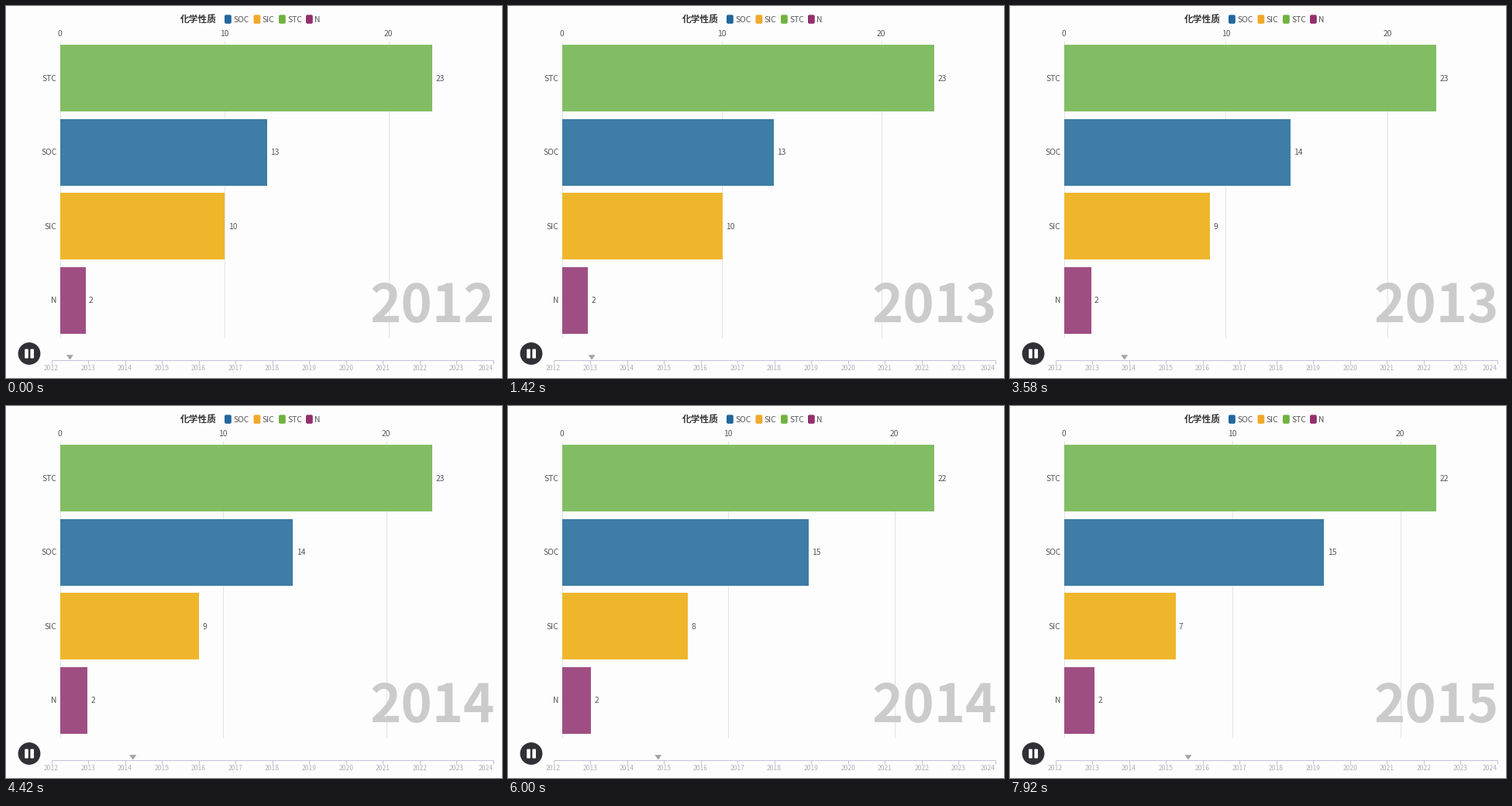
These frames come from a looping animation (640 px wide and 480 px high, 8000 ms). A matplotlib script:

```python
import numpy as np
import matplotlib.pyplot as plt
from matplotlib.animation import FuncAnimation
from matplotlib.patches import Circle, FancyBboxPatch, Polygon, Rectangle

W, H, DPI = 640, 480, 100
FRAMES, STEP = 200, 40
RATE = 12  # visible steps per second
PX = 72 / DPI

BG, INK, DARK = "#fdfdfd", "#555555", "#303036"
GRID, TIMELINE, FAINT = "#e0e2ec", "#c2c2dc", "#b2b2ba"

X0, BAR_END = 69.5, 550
TOP, PITCH, BAR_H = 50, 95.5, 86
TL_X0, TL_STEP, TL_Y = 58.5, 47.52, 456.5

# elapsed time (ms) against years since 2012
CLOCK = ([0, 1420, 2420, 3580, 5330, 6670, 8000],
         [0.504, 1.045, 1.424, 1.876, 2.586, 3.108, 3.642])

# values at the start of the loop and at each new year
YEARS = [0.504, 1, 2, 3, 4]
SERIES = {
    "STC": ([22.65, 23.33, 22.96, 22.29, 22.02], "#82bd63"),
    "SOC": ([12.62, 13.21, 14.10, 14.95, 15.80], "#3d7da6"),
    "SIC": ([10.04, 10.12, 8.86, 7.35, 6.17], "#efb62c"),
    "N": ([1.57, 1.635, 1.69, 1.765, 1.848], "#9f4e83"),
}
LEGEND = [("SOC", 282, "#23669c"), ("SIC", 319.5, "#f0a92b"),
          ("STC", 352, "#70b340"), ("N", 387, "#91306c")]

plt.rcParams["font.family"] = ["Noto Sans CJK JP", "DejaVu Sans"]
fig = plt.figure(figsize=(W / DPI, H / DPI), dpi=DPI, facecolor=BG)
ax = fig.add_axes([0, 0, 1, 1])
ax.set(xlim=(0, W), ylim=(H, 0))
ax.axis("off")


def label(x, y, s, size=10.3, color=INK, ha="left", weight="normal", z=5):
    return ax.text(x, y, s, fontsize=size * PX, color=color, ha=ha,
                   va="baseline", weight=weight, zorder=z)


def line(xs, ys, color, z=3):
    return ax.plot(xs, ys, color=color, lw=PX, zorder=z,
                   solid_capstyle="butt")[0]


def rounded(x, y, w, h, r, color, z=5):
    ax.add_patch(FancyBboxPatch((x + r, y + r), w - 2 * r, h - 2 * r,
                                boxstyle=f"round,pad={r}", fc=color,
                                lw=0, zorder=z))


# legend
label(225, 21.3, "化学性质", 11.7, "#333333", weight="bold")
for name, x, color in LEGEND:
    rounded(x, 11.4, 8.8, 11.4, 2, color)
    label(x + 11.3, 21, name)

# play control
ax.add_patch(Circle((30, 448.5), 14.4, fc=DARK, lw=0, zorder=5))
for x in (24.2, 31.4):
    rounded(x, 442.6, 4.6, 12, 1, "white", 6)

# timeline
line([TL_X0, TL_X0 + 12 * TL_STEP], [TL_Y] * 2, TIMELINE)
for i in range(13):
    x = TL_X0 + i * TL_STEP
    line([x, x], [TL_Y, TL_Y + 5], TIMELINE)
    label(min(x, 619.6), 469.6, str(2012 + i), 8.6, FAINT, "center")
pointer = ax.add_patch(Polygon([[0, 0]] * 3, fc="#a2a2a8", lw=0, zorder=6))

# chart
line([X0, X0], [45, 428], GRID, 1)
label(X0, 39, "0", ha="center")
ticks = [(v, line([X0, X0], [45, 428], GRID, 1),
          label(X0, 39, str(v), ha="center")) for v in (10, 20)]

bars = []
for i, (name, (values, color)) in enumerate(SERIES.items()):
    y = TOP + i * PITCH
    base = y + BAR_H / 2 + 3.6
    rect = ax.add_patch(Rectangle((X0, y), 0, BAR_H, fc=color, lw=0, zorder=2))
    label(65.6, base, name, ha="right")
    bars.append((values, rect, label(X0, base, "")))

year_text = label(630.5, 408, "", 68.4, "#cbcbcb", "right", "bold", 2)


def draw(n):
    step = int((n * STEP + 30) * RATE / 1000)
    year = np.interp(step * 1000 / RATE, *CLOCK)
    now = [np.interp(year, YEARS, values) for values, _, _ in bars]
    scale = (BAR_END - X0) / max(now)

    for v, (_, rect, text) in zip(now, bars):
        rect.set_width(v * scale)
        text.set_x(X0 + v * scale + 4.3)
        text.set_text(f"{v:.0f}")

    for v, grid, text in ticks:
        x = X0 + v * scale
        grid.set_xdata([x, x])
        text.set_x(x)

    x = TL_X0 + year * TL_STEP
    pointer.set_xy([(x - 4.5, 450.2), (x + 4.5, 450.2), (x, 456.5)])
    year_text.set_text(str(2012 + int(year)))
    return []


anim = FuncAnimation(fig, draw, frames=FRAMES, interval=STEP,
                     init_func=lambda: draw(0), repeat=True, repeat_delay=0)
plt.show()
```
